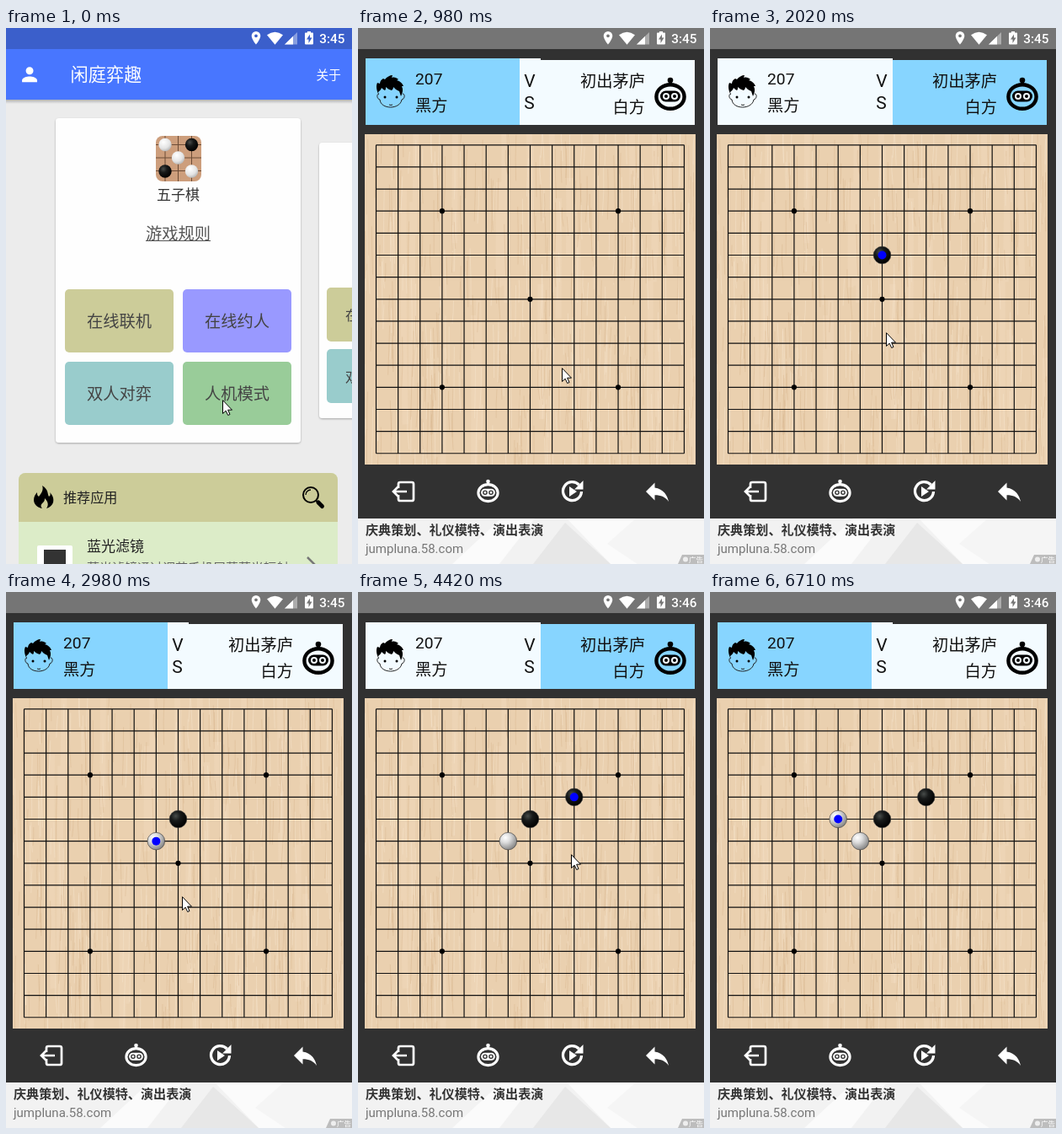
An HTML page that plays this animation: 411 px wide and 636 px high, repeating every 8000 ms.

```html
<!DOCTYPE html>
<html lang="zh-CN">
<head>
<meta charset="utf-8">
<title>五子棋</title>
<style>
html, body { margin: 0; width: 100%; height: 100%; overflow: hidden; background: #313131; }
svg { display: block; width: 411px; height: 636px; }
text { font-family: Roboto, "Noto Sans CJK SC", "Noto Sans CJK", sans-serif; }
.mid { text-anchor: middle; }
.end { text-anchor: end; }
.btn { font-size: 19.25px; fill: #444; text-anchor: middle; }
.info { font-size: 19.25px; fill: #111; }
.line { fill: none; stroke: currentColor; }

/* Every change is a hard cut within one 8 s loop. */
.home, .game, .ad, .tools, .cursor, .early, .late, .left, .right,
.b1, .w1, .b2, .w2, .m1, .m2, .m3, .m4 { animation: 8s step-end infinite; }
.home { animation-name: home; }
.game { animation-name: game; }
.ad { animation-name: ad; }
.tools { animation-name: tools; }
.cursor { animation-name: cursor; }
.early { animation-name: early; }
.late { animation-name: late; }
.left { animation-name: left; }
.right { animation-name: right; }
.b1 { animation-name: b1; }
.w1 { animation-name: w1; }
.b2 { animation-name: b2; }
.w2 { animation-name: w2; }
.m1 { animation-name: m1; }
.m2 { animation-name: m2; }
.m3 { animation-name: m3; }
.m4 { animation-name: w2; }

@keyframes home { 0% { visibility: visible } 3.5%, 100% { visibility: hidden } }
@keyframes game { 0% { visibility: hidden } 3.5%, 100% { visibility: visible } }
@keyframes ad { 0% { opacity: 0 } 12.25%, 100% { opacity: 1 } }
@keyframes tools { 0% { transform: translateY(26.5px) } 12.25%, 100% { transform: none } }
@keyframes early { 0% { opacity: 1 } 55.25%, 100% { opacity: 0 } }
@keyframes late { 0% { opacity: 0 } 55.25%, 100% { opacity: 1 } }
@keyframes left {
  0%, 37.25%, 64.125%, 100% { opacity: 1 }
  25.25%, 52.125% { opacity: 0 }
}
@keyframes right {
  0%, 37.25%, 64.125%, 100% { opacity: 0 }
  25.25%, 52.125% { opacity: 1 }
}
@keyframes b1 { 0% { opacity: 0 } 25.25%, 100% { opacity: 1 } }
@keyframes w1 { 0% { opacity: 0 } 37.25%, 100% { opacity: 1 } }
@keyframes b2 { 0% { opacity: 0 } 50.625%, 100% { opacity: 1 } }
@keyframes w2 { 0% { opacity: 0 } 64.125%, 100% { opacity: 1 } }
@keyframes m1 { 0%, 37.25%, 100% { opacity: 0 } 25.25% { opacity: 1 } }
@keyframes m2 { 0%, 50.625%, 100% { opacity: 0 } 37.25% { opacity: 1 } }
@keyframes m3 { 0%, 64.125%, 100% { opacity: 0 } 50.625% { opacity: 1 } }
@keyframes cursor {
  0% { transform: translate(257px, 441px); opacity: 1 }
  8.875% { transform: translate(250px, 422px) }
  10.375% { transform: translate(243px, 403px) }
  12.25% { transform: translate(242px, 403px) }
  17.25% { transform: translate(231px, 366px) }
  18.75% { transform: translate(212px, 305px) }
  20.375% { transform: translate(199px, 261px) }
  21.875% { transform: translate(209px, 361px) }
  45.75% { transform: translate(199px, 300px) }
  47.25% { transform: translate(254px, 235px) }
  48.75% { transform: translate(253px, 311px) }
  68% { transform: translate(292px, 407px) }
  69.875% { transform: translate(317px, 484px) }
  71.375% { transform: translate(334px, 532px) }
  73.25% { transform: translate(343px, 543px) }
  74.75% { transform: translate(347px, 546px) }
  76.75% { transform: translate(351px, 546px) }
  78.5% { transform: translate(352px, 546px) }
  82% { transform: translate(383px, 578px); opacity: 1 }
  83.875%, 100% { transform: translate(383px, 578px); opacity: 0 }
}
</style>
</head>
<body>
<svg viewBox="0 0 411 636">
  <defs>
    <radialGradient id="black" cx=".36" cy=".32" r=".7">
      <stop offset="0" stop-color="#484c4a"/><stop offset=".4" stop-color="#181a1a"/><stop offset="1" stop-color="#000"/>
    </radialGradient>
    <radialGradient id="white" cx=".34" cy=".3" r=".8">
      <stop offset="0" stop-color="#fff"/><stop offset=".35" stop-color="#dedede"/><stop offset="1" stop-color="#777"/>
    </radialGradient>
    <radialGradient id="pearl" cx=".38" cy=".3" r=".8">
      <stop offset="0" stop-color="#fff"/><stop offset=".6" stop-color="#e4e4e4"/><stop offset="1" stop-color="#aaa"/>
    </radialGradient>
    <linearGradient id="shade" x2="0" y2="1">
      <stop offset="0" stop-color="#000" stop-opacity=".25"/><stop offset="1" stop-color="#000" stop-opacity="0"/>
    </linearGradient>
    <filter id="drop" x="-5%" y="-5%" width="110%" height="110%">
      <feDropShadow dx="0" dy="1" stdDeviation="1" flood-opacity=".3"/>
    </filter>
    <clipPath id="boardClip"><rect x="8" y="126" width="393" height="392"/></clipPath>
    <g id="robot">
      <ellipse class="line" cy="3" rx="16.6" ry="14.3" stroke-width="4.4"/>
      <path class="line" d="M0-11V-17" stroke-width="4"/>
      <circle cy="-16.5" r="3.3" fill="currentColor"/>
      <rect x="-12" y="-4" width="24" height="13" rx="6.5" fill="currentColor"/>
    </g>
  </defs>

  <g class="home">
    <rect width="411" height="636" fill="#ececec"/>
    <rect y="85" width="411" height="5" fill="url(#shade)"/>
    <rect width="411" height="25" fill="#3b5fcb"/>
    <rect y="25" width="411" height="60" fill="#4876ff"/>
    <path fill="#fff" transform="translate(14.6 41.8) scale(1.12)" d="M12 12a4 4 0 1 0 0-8 4 4 0 0 0 0 8zm0 2c-2.7 0-8 1.3-8 4v2h16v-2c0-2.7-5.3-4-8-4z"/>
    <text x="76.5" y="63" font-size="21.2" fill="#fff">闲庭弈趣</text>
    <text x="368.5" y="61" font-size="14.7" fill="#fff">关于</text>

    <rect x="59" y="107" width="291" height="385" rx="4" fill="#fefefe" filter="url(#drop)"/>
    <g>
      <rect x="178" y="128" width="54" height="54" rx="8" fill="#cd9e7c"/>
      <path stroke="#6d4c37" d="M189 128v54M204.500 128v54M220.500 128v54M178 138.500h54M178 154h54M178 169.500h54"/>
      <g fill="url(#pearl)"><circle cx="189" cy="138.500" r="7.700"/><circle cx="204.500" cy="154" r="7.700"/><circle cx="220.500" cy="170" r="7.700"/></g>
      <g fill="url(#black)"><circle cx="220.500" cy="138.500" r="7.700"/><circle cx="189" cy="170" r="7.700"/></g>
    </g>
    <text class="mid" x="204.500" y="203.500" font-size="17" fill="#333">五子棋</text>
    <text class="mid" x="204.500" y="250.500" font-size="19.250" fill="#555">游戏规则</text>
    <path d="M166 252.500h77" stroke="#555" stroke-width="1.200"/>
    <rect x="70" y="310" width="129" height="75" rx="5" fill="#cc9"/>
    <rect x="210" y="310" width="129" height="75" rx="5" fill="#99f"/>
    <rect x="70" y="396" width="129" height="75" rx="5" fill="#9cc"/>
    <rect x="210" y="396" width="129" height="75" rx="5" fill="#9c9"/>
    <text class="btn" x="134.500" y="354.700">在线联机</text>
    <text class="btn" x="274.500" y="354.700">在线约人</text>
    <text class="btn" x="134.500" y="440.700">双人对弈</text>
    <text class="btn" x="274.500" y="440.700">人机模式</text>

    <rect x="372" y="136" width="248" height="327" rx="4" fill="#fefefe" filter="url(#drop)"/>
    <rect x="381" y="308" width="110" height="64" rx="5" fill="#cc9"/>
    <rect x="381" y="381" width="110" height="64" rx="5" fill="#9cc"/>
    <text x="403" y="346.500" font-size="16.400" fill="#444">在线联机</text>
    <text x="403" y="419.500" font-size="16.400" fill="#444">双人对弈</text>

    <path d="M15 640V536a8 8 0 0 1 8-8h363a8 8 0 0 1 8 8v104z" fill="#dcecc8"/>
    <path d="M15 586V536a8 8 0 0 1 8-8h363a8 8 0 0 1 8 8v50z" fill="#cc9"/>
    <path d="M43 543c8 5 6 10 8 13 2-1 2-3 1-5 4 4 5 8 4 12-1 3-4 6-8 7 3-4 2-8-2-12 0 3-1 4-3 6-2 2-2 4 0 6-6-1-10-5-10-10 0-4 2-7 4-9 0 2 0 4 2 5 3-4 6-8 4-13z"/>
    <text x="68" y="563" font-size="16.100" fill="#222">推荐应用</text>
    <circle cx="362" cy="554" r="9" fill="none" stroke="#000" stroke-width="2"/>
    <path d="M356 554a6 6 0 0 1 6-6" fill="none" stroke="#000" stroke-width="1.300"/>
    <path d="M368.500 561l2 2" stroke="#000" stroke-width="2"/>
    <path d="M371 563l4.500 4.500" stroke="#000" stroke-width="5" stroke-linecap="round"/>
    <rect x="37" y="614" width="42" height="42" rx="2" fill="#fff"/>
    <rect x="45" y="619" width="26" height="26" fill="#333"/>
    <text x="96" y="620.500" font-size="17" fill="#222">蓝光滤镜</text>
    <text x="96" y="645.500" font-size="15" fill="#666">蓝光滤镜通过调节手机屏幕蓝光辐射</text>
    <path d="M358 628l10 10-10 10" fill="none" stroke="#777" stroke-width="2.500"/>
  </g>

  <g class="game">
    <rect width="411" height="636" fill="#313131"/>
    <rect width="411" height="25" fill="#757575"/>
    <rect x="9" y="36" width="208" height="79" fill="#f3fbff"/>
    <rect x="217" y="38" width="183" height="77" fill="#f3fbff"/>
    <g fill="#87d5ff">
      <g class="left"><rect x="9" y="36" width="183" height="79"/></g>
      <g class="right"><rect x="217" y="38" width="183" height="77"/></g>
    </g>
    <path d="M25 80c-3-6-4-11-2-15l3 1c0-3 2-5 4-6l2 1c2-3 6-5 9-5l-1 3c3-1 6 0 8 2l-2 1c4 1 7 4 8 7l-2 0c2 4 1 8-1 12l-2-6c-3-1-5-3-7-5 0 2-1 3-2 4-3-1-5-2-7-4 0 2 0 3-1 4-2-1-3-2-4-3-1 3-3 4-4 5z"/>
    <path d="M25 78c-3 0-3 6 1 7 1 12 24 12 26 0 4-1 4-7 1-7M37 91q2 1 4 0" fill="none" stroke="#222" stroke-width="1"/>
    <circle cx="32" cy="82" r="1.500"/><circle cx="46" cy="82" r="1.500"/>
    <text class="info" x="68" y="67">207</text>
    <text class="info" x="68" y="99">黑方</text>
    <text class="mid" x="204" y="70" font-size="21" fill="#111">V</text>
    <text class="mid" x="203.500" y="96" font-size="21" fill="#111">S</text>
    <text class="info end" x="341" y="69.500">初出茅庐</text>
    <text class="info end" x="341" y="101">白方</text>
    <g transform="translate(371 78.500)">
      <use href="#robot" color="#000"/>
      <g fill="none" stroke="#f3fbff" stroke-width="2"><circle cx="-5" cy="2.500" r="3"/><circle cx="5" cy="2.500" r="3"/></g>
    </g>

    <rect x="8" y="126" width="393" height="392" fill="#ead0af"/>
    <g clip-path="url(#boardClip)" fill="none">
      <path id="bands" stroke="#f3dfc4" stroke-width="7" opacity=".28"/>
      <path id="pale" stroke="#f6e4cb" opacity=".5"/>
      <path id="dark" stroke="#d3af86" opacity=".36"/>
    </g>
    <path id="grid" fill="none" stroke="#111" stroke-width="1.200"/>
    <g id="stars"></g>
    <g id="stones"></g>

    <g class="tools">
      <g color="#fff" fill="none" stroke="#fff" stroke-width="2.700">
        <path d="M48 546v-5q0-2 2-2h14q2 0 2 2v18q0 2-2 2h-14q-2 0-2-2v-5M58 550H43M47.500 544.500l-5.500 5.500 5.500 5.500"/>
        <g transform="translate(154.500 549.500) scale(.7)" stroke="none">
          <use href="#robot"/>
          <g stroke="#313131" stroke-width="2"><circle cx="-5" cy="2.500" r="3"/><circle cx="5" cy="2.500" r="3"/></g>
        </g>
        <path d="M262.500 542a11 11 0 1 0 3 8" stroke-width="3.300"/>
        <path d="M267.500 537v10.500h-10.500zM251 544v12l9-6z" fill="#fff" stroke="none"/>
      </g>
      <path fill="#fff" transform="translate(337.500 532) scale(1.500)" d="M10 9V5l-7 7 7 7v-4.100c5 0 8.500 1.600 11 5.100-1-5-4-10-11-11z"/>
    </g>

    <g class="ad">
      <rect y="582" width="411" height="54" fill="#f2f2f2"/>
      <path d="M112 636l58-54h40l-42 54zM300 636l-52-54h163v54z" fill="#fbfbfb"/>
      <path d="M208 636l38-49 54 49z" fill="#e7e7e7"/>
      <path d="M330 582l-34 30 36 24h79v-54z" fill="#f5f5f5"/>
      <text x="9" y="601" font-size="15.100" font-weight="700" fill="#333">庆典策划、礼仪模特、演出表演</text>
      <text x="9" y="623" font-size="15" fill="#777">jumpluna.58.com</text>
      <path d="M380 636l5-11h26v11z" fill="#bdbdbd"/>
      <circle cx="389" cy="630.500" r="3" fill="#eee"/>
      <text x="393" y="634" font-size="8.500" fill="#fff">广告</text>
    </g>
  </g>

  <g fill="#fff">
    <path d="M297 4a5.300 5.300 0 0 0-5.300 5.300c0 4 5.300 10.400 5.300 10.400s5.300-6.400 5.300-10.400a5.300 5.300 0 0 0-5.300-5.300zm0 3.400a1.900 1.900 0 1 1 0 3.800 1.900 1.900 0 0 1 0-3.800z"/>
    <path d="M310 8.300q9.500-7 19 0l-9.500 11.400z"/>
    <path d="M346 5v14.500h-15z" opacity=".4"/>
    <path d="M341 9.800v9.700h-10z"/>
    <path fill-rule="evenodd" d="M358 5.500v-1.500h4v1.500h2q1 0 1 1v12q0 1-1 1h-8q-1 0-1-1v-12q0-1 1-1zm3 2l-4 6h2.500v4.500l4-6.500h-2.500z"/>
    <g class="end" font-size="15.300" font-weight="500">
      <text class="early" x="402.500" y="18">3:45</text>
      <text class="late" x="402.500" y="18">3:46</text>
    </g>
  </g>
  <g class="cursor"><path d="M.5.700V16.500L4.200 13.200 6.700 18.500 9 17.500 6.600 12.200H11.500Z" fill="#fff" stroke="#000" stroke-width="1"/></g>
</svg>
<script>
const $ = id => document.getElementById(id);
const cell = 26.14, px = c => 21.5 + c * cell, py = r => 138.8 + r * cell;

let grid = "";
for (let i = 0; i < 15; i++) {
  grid += `M${px(i)} ${py(0)}V${py(14)}M${px(0)} ${py(i)}H${px(14)}`;
}
$("grid").setAttribute("d", grid);

const disc = (c, r, size, attrs) =>
  `<circle cx="${px(c)}" cy="${py(r)}" r="${size}" ${attrs}/>`;
$("stars").innerHTML = [[3, 3], [11, 3], [7, 7], [3, 11], [11, 11]]
  .map(([c, r]) => disc(c, r, 3.1, "")).join("");

// column, row, colour, stone class, last-move marker class
$("stones").innerHTML = [
  [7, 5, "black", "b1", "m1"],
  [6, 6, "white", "w1", "m2"],
  [9, 4, "black", "b2", "m3"],
  [5, 5, "white", "w2", "m4"]
].map(([c, r, tone, stone, mark]) =>
  disc(c, r, 10.3, `class="${stone}" fill="url(#${tone})" stroke="#333" stroke-width=".6"`) +
  disc(c, r, 5, `class="${mark}" fill="#00f"`)).join("");

// Wood grain: seeded, nearly vertical streaks.
let seed = 7;
const rnd = n => (seed = seed * 16807 % 2147483647) / 2147483647 * n;
function grain(id, count, length) {
  let d = "";
  for (let i = 0; i < count; i++) {
    const len = length * (0.3 + rnd(0.7));
    d += `M${8 + rnd(393)} ${126 + rnd(420) - len / 2}q${rnd(3) - 1.5} ${len / 2} ${rnd(4) - 2} ${len}`;
  }
  $(id).setAttribute("d", d);
}
grain("bands", 30, 300);
grain("pale", 230, 80);
grain("dark", 260, 70);
</script>
</body>
</html>
```
